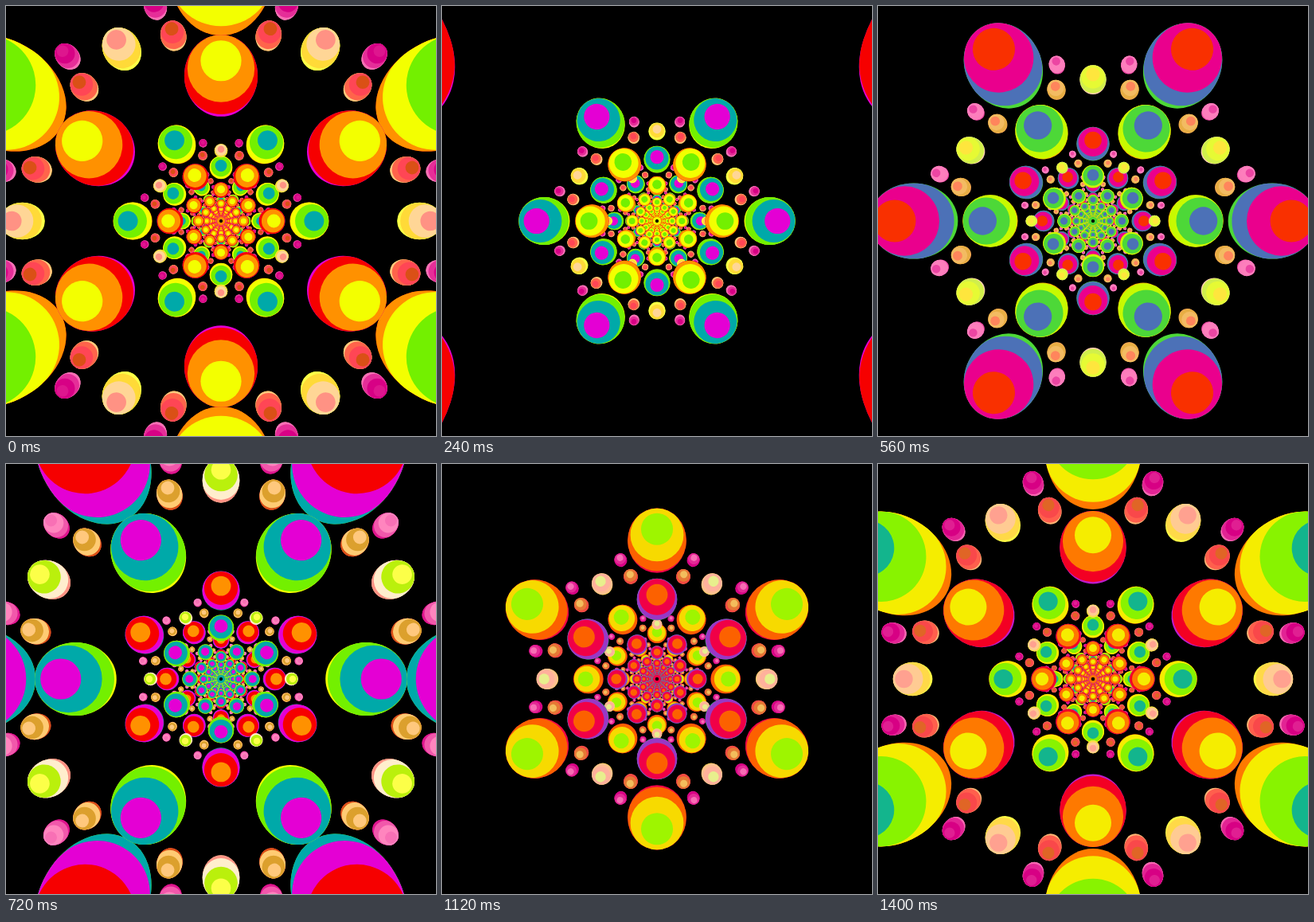
Animation, 540 px wide and 540 px high, one loop 1.44 s. Source, as an HTML page with a canvas:

```html
<!DOCTYPE html>
<html lang="en">
<head>
<meta charset="utf-8">
<title>Sphere tunnel</title>
<style>
  html, body { margin: 0; width: 100%; height: 100%; overflow: hidden; background: #000; }
  canvas { display: block; }
</style>
</head>
<body>
<canvas id="stage" width="540" height="540"></canvas>
<script>
const ctx = document.getElementById('stage').getContext('2d');
const TAU = Math.PI * 2;
const LOOP = 1440, TICK = 40;
const FOCAL = 370;      // focal length in px
const GAP = 2.16;       // depth between two layers
const NEAR = 1.19;      // depth of the first layer at time 0
const LAYERS = 36;
const BANDS = 6;        // colour bands from pole to pole

const rgb = hex => [16, 8, 0].map(s => parseInt(hex, 16) >> s & 255);
const mix = (a, b, f) => `rgb(${a.map((v, i) => Math.round(v + (b[i] - v) * f))})`;

// Colour cycles over positions 0 to 6: straight fades between keys, or a wave between two tones
function ramp(keys) {
  const list = keys.split(' ').map(rgb), n = list.length;
  return pos => {
    const p = (pos % n + n) % n, i = Math.floor(p);
    return mix(list[i], list[(i + 1) % n], p - i);
  };
}
function wave(deep, light, peak) {
  return pos => mix(rgb(deep), rgb(light), (1 + Math.cos((pos - peak) * TAU / BANDS)) / 2);
}

const vivid = ramp('f60000 ff9100 f3ff00 73f000 00a9a9 e400d4');
const pale = ramp('ff9284 ffd696 ffda38 fcff48 baf00c ffeecd');
const amber = ramp('da5016 ff4655 ff644b ffc87d dca02d ffcb73');
const pink = wave('d70084', 'ff86bf', 3.8);

// dist: from the axis, size: radius, spread: degrees to both sides of the arm
// first: colour position at the pole, dir: colour order from pole to pole
const families = [
  { dist: 0.907, size: 0.046, spread: 17, color: pink, first: 0, dir: 1 },
  { dist: 0.799, size: 0.075, spread: 30, color: pale, first: 0, dir: 1 },
  { dist: 0.771, size: 0.052, spread: 14.4, color: amber, first: 0, dir: 1 },
  { dist: 1, size: 0.213, spread: 0, color: vivid, first: 4, dir: -1 },
  { dist: 0.578, size: 0.147, spread: 0, color: vivid, first: 2, dir: -1 }
];

// Projection of one banded sphere, seen along its arm (x axis)
function project({ dist, size }, z) {
  const mid = Math.atan2(dist, z);
  const half = Math.asin(size / Math.hypot(dist, z));
  const inner = FOCAL * Math.tan(mid - half), outer = FOCAL * Math.tan(mid + half);
  const shape = {
    x: (inner + outer) / 2,
    rx: (outer - inner) / 2,
    ry: FOCAL * size / Math.sqrt(z * z - size * size),
    inner, outer, base: BANDS - 1, caps: []
  };
  for (let k = BANDS - 1; k > 0; k--) {
    const angle = k * Math.PI / BANDS, sin = Math.sin(angle), cos = Math.cos(angle);
    const turn = (z * cos - size) / (dist * sin);
    if (turn <= -1) {           // rim hidden behind the sphere
      shape.base = k - 1;
      continue;
    }
    const scale = FOCAL / (z - size * cos);
    shape.caps.push({
      band: k - 1,
      x: scale * dist,
      r: scale * size * sin,
      cut: turn < 1 ? scale * (dist + size * sin * turn) : null
    });
  }
  return shape;
}

function drawSphere(s, fills) {
  const tiny = s.ry < 1.6;
  ctx.beginPath();
  ctx.ellipse(s.x, 0, s.rx, s.ry, 0, 0, TAU);
  ctx.fillStyle = fills[tiny ? 1 : s.base];
  ctx.fill();
  if (tiny) return;
  ctx.save();
  if (s.caps.some(c => c.cut !== null)) ctx.clip();
  for (const c of s.caps) {
    ctx.fillStyle = fills[c.band];
    ctx.beginPath();
    ctx.arc(c.x, 0, c.r, 0, TAU);
    ctx.fill();
    if (c.cut !== null) ctx.fillRect(c.cut, -s.ry, s.outer - c.cut, s.ry * 2);
  }
  ctx.restore();
}

function drawLayer(z, turn, fills) {
  families.forEach((fam, i) => {
    const shape = project(fam, z), { spread } = fam;
    if (shape.inner > 400) return;
    const sides = spread % 30 ? [-spread, spread] : [spread];
    for (let arm = 0; arm < 360; arm += 60) {
      for (const side of sides) {
        ctx.save();
        ctx.rotate((turn + arm + side) * TAU / 360);
        drawSphere(shape, fills[i]);
        ctx.restore();
      }
    }
  });
}

function draw(time) {
  const phase = time / LOOP;
  const fills = families.map(f => Array.from({ length: BANDS },
    (_, band) => f.color(f.first + f.dir * band + phase * BANDS)));
  ctx.fillStyle = '#000';
  ctx.fillRect(0, 0, 540, 540);
  ctx.save();
  ctx.translate(270, 270);
  for (let n = LAYERS; n >= 0; n--) {
    const z = NEAR + (n - phase * 2) * GAP;
    if (z > 0.3) drawLayer(z, n % 2 ? 0 : 30, fills);
  }
  ctx.restore();
}

let last = -1;
const start = performance.now();
function loop() {
  const t = Math.max(0, performance.now() - start) % LOOP;
  const time = Math.floor(t / TICK) * TICK;
  if (time !== last) draw(last = time);
  requestAnimationFrame(loop);
}
loop();
</script>
</body>
</html>
```
